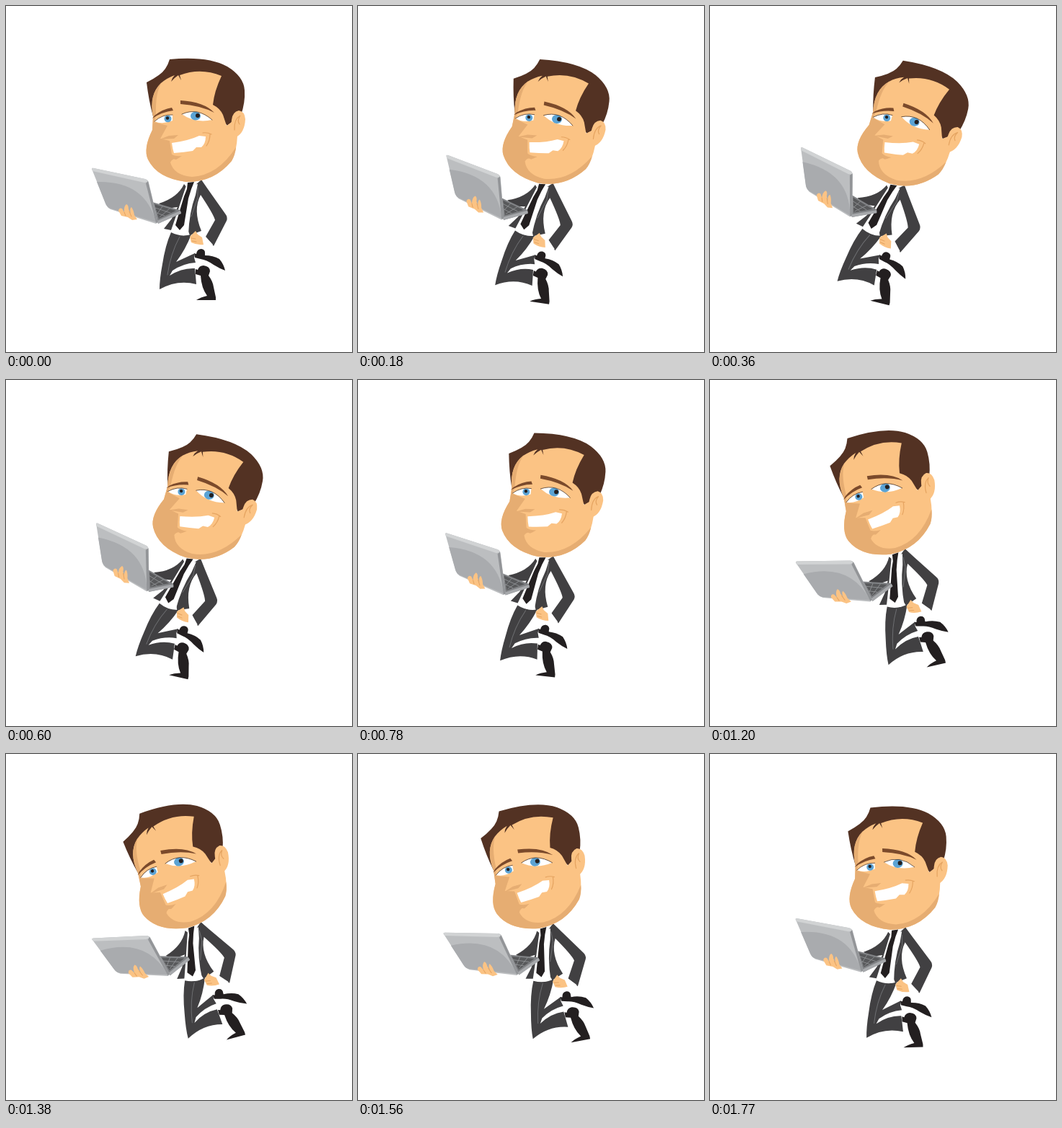
An HTML page for the animation above (1.8 s loop, 480 px wide and 480 px high).

```html
<!DOCTYPE html>
<html>
<head>
<meta charset="utf-8">
<style>
html, body { margin: 0; height: 100%; overflow: hidden; background: #fff }
svg { display: block; width: 100vw; height: 100vh }
.suit { fill: #414042 }
.black { fill: #231f20 }
.skin { fill: #fbc384 }
.shade { fill: #e6ad72 }
.hair { fill: #533223 }
.brow { fill: #7b4a2b }
.white { fill: #fff }
.iris { fill: #5ba3d4 }
.line { fill: none; stroke-linecap: round }
</style>
</head>
<body>
<svg viewBox="0 0 480 480">
<g id="man">
  <!-- legs and shoes -->
  <g class="black">
    <path d="M261 343L264 344Q265 337 271 337Q277 338 276 344L276 346Q287 346 296 351Q302 358 304 367Q296 364 288 359Q278 352 270 351L262 349Z"/>
    <path d="M263 365L266 366Q268 360 274 360Q283 361 283 368L281 374Q287 382 288 390L291 404V408H264Q270 404 279 402Q271 391 270 374L263 372Z"/>
  </g>
  <path class="suit" d="M229 314Q243 321 257 317Q249 338 236 355Q249 349 262 343L261 349L263 356Q246 357 231 367L227 374Q244 363 262 364L263 374L264 386Q238 379 213 393Q213 379 217 358Q221 332 229 314Z"/>
  <path class="line" stroke="#6d6e71" d="M241 320Q228 344 224 373"/>
  <!-- jacket, shirt and tie -->
  <path class="suit" d="M247 247Q238 266 212 274L222 281L238 279L230 295L219 309L229 311L240 300L256 258Z"/>
  <path class="suit" d="M262 249L271 241L280 254L304 288Q308 293 306 298L288 333L277 320L290 297Q288 289 270 262Q259 283 271 312L255 318L250 305Z"/>
  <path class="white" d="M250 249L266 247L263 262Q254 287 253 317Q241 321 229 311L237 288Z"/>
  <path class="line" stroke="#77787b" stroke-width=".8" d="M266 252L266 266L257 292"/>
  <path class="black" d="M252 245L261 244L257 254L253 267L247 304L241 311L235 304L247 264L251 254Z"/>
  <path class="white" d="M275 318L287 331L281 334L271 323Z"/>
  <path class="skin" d="M263 312L266 317L272 321L274 331Q265 332 257 328L255 320Z"/>
  <path class="line" stroke="#e5a461" d="M257 322L263 323M258 326L264 327"/>
  <!-- laptop -->
  <path fill="#808285" d="M203 272L241 283L243 287L211 302Z"/>
  <path fill="#58595b" d="M206 275L236 284L212 295Z"/>
  <path class="line" stroke="#939598" stroke-width=".8" d="M207 280L228 287M209 287L220 291M217 278L210 288M227 281L213 293"/>
  <path fill="#a7a9ac" d="M210 298L242 284L243 288L211 302Z"/>
  <path fill="#bcbec0" d="M119 226Q119 224 122 225L193 240Q197 241 198 245L211 300L208 302L145 282Q141 280 139 276Z"/>
  <path fill="#a9abae" d="M126 244Q193 242 208 300L145 281Q140 279 138 274Z"/>
  <path fill="#d1d3d4" d="M119 226Q119 224 122 225L193 240Q196 241 197 244L192 245L120 229Z"/>
  <path fill="#939598" d="M197 243L211 300L208 301L194 246Z"/>
  <path class="skin" d="M156 284Q157 279 161 281L164 286Q163 278 167 275Q170 276 170 282L173 288Q171 281 174 279Q177 283 178 290L182 296L175 297L169 293L160 291Z"/>
  <path class="line" stroke="#e5a461" d="M164 286L166 291M171 285L174 292"/>
  <!-- head -->
  <path class="hair" d="M227 74Q280 69 307 84Q330 98 331 117Q332 134 326 151L307 166L286 140L204 153Q198 131 195 106Q215 96 221 87Q225 81 227 74Z"/>
  <path class="skin" d="M313 158Q314 147 323 145Q331 146 332 157Q331 176 319 182L310 185Z"/>
  <path class="skin" d="M204 153Q198 123 215 107Q223 100 234 96Q230 100 229 105Q233 100 239 96L243 103L241 96Q270 85 299 97Q289 118 287 137Q297 142 301 151L306 166L313 161L321 180Q320 202 313 215Q288 245 250 244Q210 239 197 213Q190 198 203 172Z"/>
  <path class="shade" d="M204 153Q198 123 216 106Q207 120 208 151L206 161L224 166L214 184L227 187L230 206L240 211Q230 211 228 217Q233 235 258 237Q294 235 319 196Q318 207 313 215Q288 245 250 244Q210 239 197 213Q190 198 203 172Z"/>
  <path class="shade" d="M213 185L233 184L239 179L226 180ZM228 205Q235 209 244 208L236 213Q229 212 228 205Z"/>
  <path class="line" stroke="#e5a461" stroke-width="1.200" d="M273 176Q279 175 285 178M283 178Q283 187 278 194M317 172Q316 157 325 152Q320 159 324 164"/>
  <path class="white" d="M230 190Q253 187 268 180L277 181Q277 191 271 196L264 196L259 201Q247 203 233 204Q231 198 230 190Z"/>
  <!-- eyes and brows -->
  <path class="white" d="M206 160Q217 150 231 151L231 159Q217 165 206 160Z"/>
  <path class="white" d="M244 150Q266 140 286 158Q262 163 244 150Z"/>
  <ellipse class="iris" cx="224.500" cy="156.500" rx="5" ry="4.800"/>
  <ellipse class="iris" cx="263" cy="152.500" rx="7" ry="6"/>
  <circle class="black" cx="224" cy="155.500" r="2.200"/>
  <circle class="black" cx="266" cy="152" r="3"/>
  <path class="line" stroke="#3c2415" stroke-width=".7" d="M206 160Q217 150 231 151M244 150Q266 140 286 158"/>
  <path class="brow" d="M203 156L206 152Q217 143 230 141L232 145Q216 147 203 156Z"/>
  <path class="brow" d="M242 131Q275 133 289 148Q270 138 242 136Z"/>
</g>
</svg>
<script>
const man = document.getElementById('man');
const period = 1800, step = 30, swing = 14.8;

function draw() {
  const t = Math.floor(performance.now() % period / step) * step;
  const angle = swing * Math.sin(2 * Math.PI * t / period);
  man.setAttribute('transform', `rotate(${angle} 240 240)`);
  requestAnimationFrame(draw);
}
draw();
</script>
</body>
</html>
```
